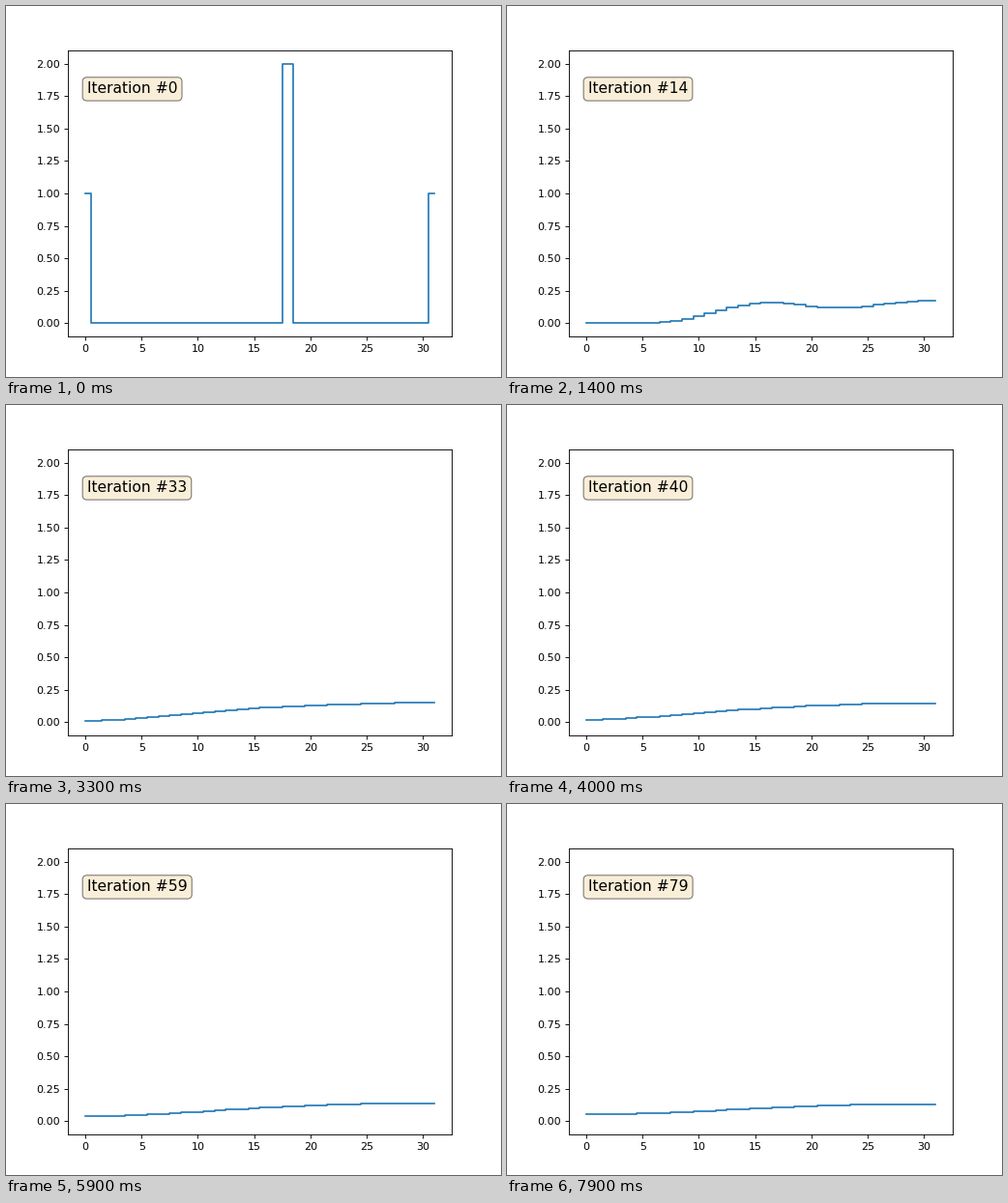
A matplotlib script that plays this animation: 512x384 px, repeating every 8000 ms.

```python
import numpy as np
import matplotlib.pyplot as plt
from matplotlib.animation import FuncAnimation

CELLS = 32
FRAMES = 80


def relax(u):
    """One in-place Gauss-Seidel sweep with zero-gradient ends."""
    u = u.copy()
    u[0] = u[1]
    for i in range(1, len(u) - 1):
        u[i] = (u[i - 1] + u[i + 1]) / 2
    u[-1] = u[-2]
    return u


start = np.zeros(CELLS)
start[[0, 18, -1]] = 1, 2, 1

states = [start]
for _ in range(FRAMES - 1):
    states.append(relax(states[-1]))

fig, ax = plt.subplots(figsize=(6.4, 4.8), dpi=80)
line, = ax.plot(np.arange(CELLS), start, drawstyle="steps-mid")
label = ax.text(0.05, 0.85, "Iteration #0", transform=ax.transAxes, fontsize=14,
                bbox=dict(boxstyle="round", facecolor="wheat", alpha=0.5))


def update(n):
    line.set_ydata(states[n])
    label.set_text(f"Iteration #{n}")
    return line, label


anim = FuncAnimation(fig, update, frames=FRAMES, interval=100, repeat=True)
plt.show()
```
